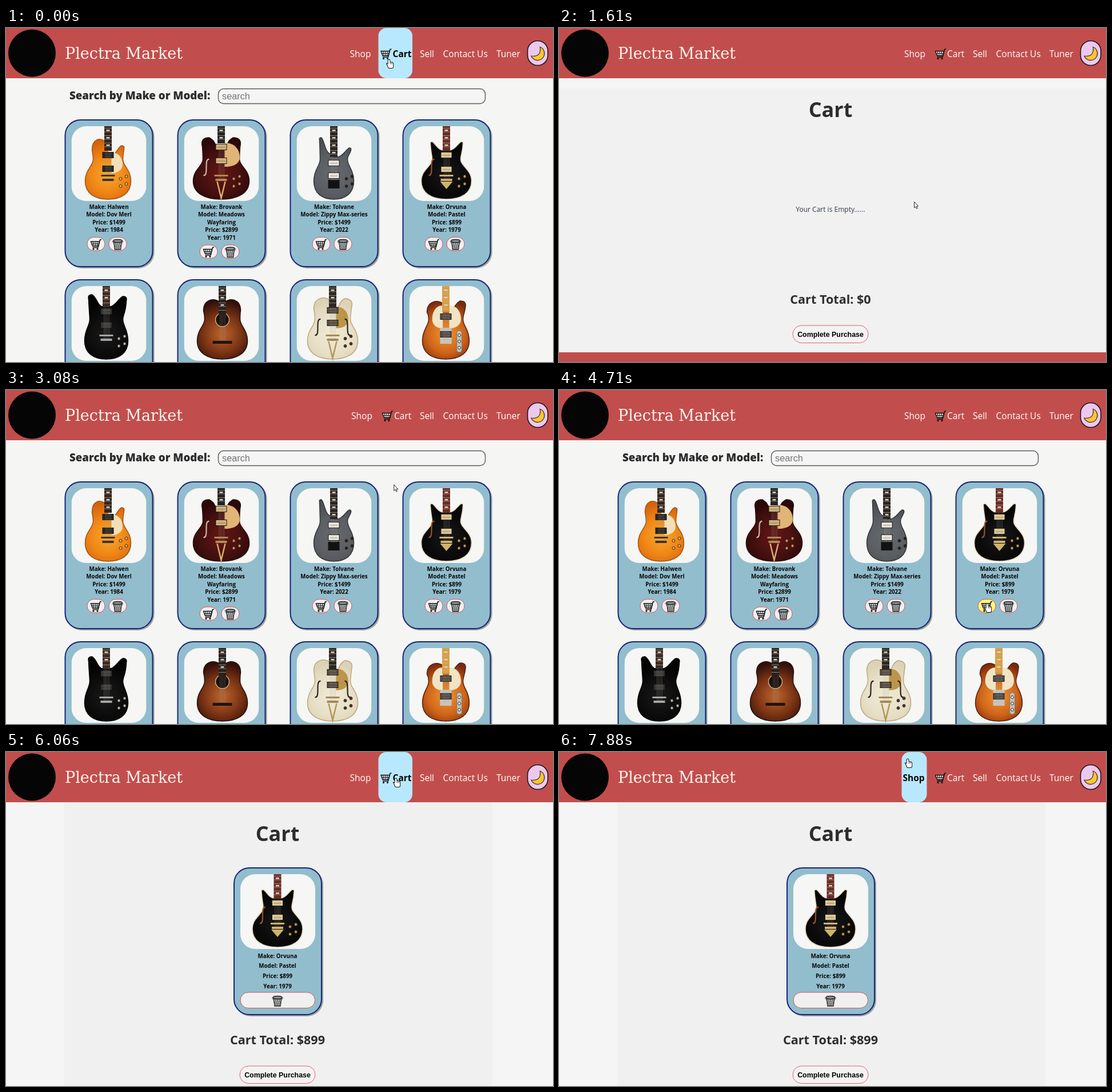
An HTML page with a canvas for the animation above (8 s loop, 957x585 px).

```html
<!DOCTYPE html>
<html lang="en">
<head>
<meta charset="utf-8">
<title>Guitar shop</title>
<style>
html, body { margin: 0; width: 100%; height: 100%; overflow: hidden; background: #f5f5f4; }
canvas { display: block; }
</style>
</head>
<body>
<canvas id="stage" width="957" height="585"></canvas>
<script>
const ctx = document.getElementById('stage').getContext('2d');
const LOOP = 8000;
const RED = '#c14e4c', INK = '#2d2d30', SKY = '#b8e8fd', PAPER = '#f5f5f4', ROSE = '#d9535c';
const UI = '"Open Sans", "Noto Sans", sans-serif';
const ARIAL = '"Liberation Sans", sans-serif';

// ---------- helpers ----------
function rect(x, y, w, h, fill) {
  ctx.fillStyle = fill;
  ctx.fillRect(x, y, w, h);
}
function paint(fill, stroke, width = 1) {
  if (fill) { ctx.fillStyle = fill; ctx.fill(); }
  if (stroke) { ctx.strokeStyle = stroke; ctx.lineWidth = width; ctx.stroke(); }
}
function pill(x, y, w, h, r, fill, stroke, width) {
  ctx.beginPath();
  ctx.roundRect(x, y, w, h, r);
  paint(fill, stroke, width);
}
function disc(x, y, r, fill, stroke, width) {
  ctx.beginPath();
  ctx.arc(x, y, r, 0, 7);
  paint(fill, stroke, width);
}
function poly(pts, fill, stroke, width) {
  ctx.beginPath();
  for (let i = 0; i < pts.length; i += 2) ctx.lineTo(pts[i], pts[i + 1]);
  if (fill) ctx.closePath();
  paint(fill, stroke, width);
}
function text(str, x, y, font, color = '#000', align = 'left') {
  ctx.font = font;
  ctx.fillStyle = color;
  ctx.textAlign = align;
  ctx.fillText(str, x, y);
}
function at(x, y, draw, sx = 1, sy = 1) {
  ctx.save();
  ctx.translate(x, y);
  ctx.scale(sx, sy);
  draw();
  ctx.restore();
}

// ---------- guitars, in a 131 px square ----------
// Shoulders are [x, y] when round, or [x, y, cut depth, tip radius] for a horn.
const guitars = [
  { cx: 64, low: 40, waist: 26, left: [28, 23], right: [28, 34, 50, 3], tones: ['#f79f28', '#ee8516', '#d3620c'],
    edge: '#a3520f', neck: '#35241d', end: 43, pickups: [46, 70], coil: '#292725', bridge: '#3a3330',
    knob: '#e8ad55', guard: [46, 27, 36, '#f2dfb8'] },
  { cx: 65, low: 49, waist: 32, left: [33, 20, 32, 8], right: [33, 20, 32, 8], tones: ['#5e1414', '#481010', '#2c0909'],
    edge: '#260707', neck: '#252122', end: 30, pickups: [32, 56], coil: '#d5b37a', bridge: '#b08a52',
    knob: '#c99a55', guard: [29, 34, 42, '#e0b577'], slots: [-1], slotColor: '#cbb9a5', vee: '#d8b06a' },
  { cx: 65, low: 35, waist: 24, left: [25, 20, 48, 2], right: [30, 38, 54, 2], tones: ['#63666a', '#5b5e62', '#4b4e52'],
    edge: '#333538', neck: '#2a2523', end: 54, pickups: [60, 82], coil: '#f0ede4', plate: [94, 15, '#121213'],
    knob: '#1e1f21' },
  { cx: 65, low: 44, waist: 25, left: [28, 27, 42, 2], right: [29, 27, 42, 2], tones: ['#151515', '#0b0b0b', '#050505'],
    edge: '#e5d8ba', neck: '#6c2c24', end: 43, pickups: [46, 71], coil: '#e2cd98', bridge: '#d1b26e',
    knob: '#c99a55', slots: [-1], slotColor: '#9a5230', tail: '#d1b26e' },
  { cx: 61, low: 38, waist: 29, left: [31, 15, 36, 4], right: [35, 18, 36, 4], tones: ['#171717', '#0c0c0c', '#030303'],
    edge: '#000', neck: '#3d2b23', end: 35, pickups: [40, 64], coil: '#3a3a3a', bridge: '#a5a5a5', knob: '#b5b5b5' },
  { cx: 67, low: 44, waist: 31, left: [33, 24], right: [32, 24], tones: ['#ad5a28', '#7c3414', '#32110a'],
    edge: '#24100b', neck: '#29211e', end: 50, hole: 59 },
  { cx: 63, low: 44, waist: 31, left: [33, 21], right: [33, 22, 38, 8], tones: ['#eee8d2', '#e8e0c8', '#dcd2b6'],
    edge: '#bda77b', neck: '#2d2824', end: 37, pickups: [38, 60], coil: '#5d5142', bridge: '#a28957',
    knob: '#423728', guard: [36, 29, 38, '#bd944a'], slots: [-1, 1], slotColor: '#2a231c', vee: '#b39658' },
  { cx: 64, low: 41, waist: 30, left: [33, 27], right: [34, 26, 44, 6], tones: ['#e88a2c', '#cf6419', '#7a2a0e'],
    edge: '#55200f', neck: '#dfa241', end: 45, guard: [34, 28, 40, '#f1e4c5'], wideGuard: true,
    plate: [73, 28, '#c7c5bf'], pickups: [49, 80], coil: '#55514c', switches: true }
];

function halfBody({ low, waist }, [x, y, cut, tip]) {
  ctx.beginPath();
  ctx.moveTo(-.5, cut || y + 3);
  ctx.lineTo(6, cut || y + 3);
  if (cut) {
    ctx.bezierCurveTo(15, cut, x - 3 * tip - 2, y + tip, x - 1.5 * tip, y);
    ctx.quadraticCurveTo(x + tip / 2, y, x, y + 2 * tip);
  } else {
    ctx.bezierCurveTo(13, y - 3, x, y - 2, x, y + 19);
  }
  ctx.bezierCurveTo(x - 1, 48, waist, 50, waist, 58);
  ctx.bezierCurveTo(waist, 70, low, 76, low, 96);
  ctx.bezierCurveTo(low, 117, low * .6, 128, -.5, 128);
}
function drawGuitar(g) {
  const tone = ctx.createRadialGradient(0, 84, 8, 0, 84, 58);
  g.tones.forEach((c, i) => tone.addColorStop(i / 2, c));
  at(g.cx, 0, () => halfBody(g, g.right) || paint(tone, g.edge, 1.5));
  at(g.cx, 0, () => halfBody(g, g.left) || paint(tone, g.edge, 1.5), -1);
  at(g.cx, 0, () => {
    if (g.guard) drawGuard(...g.guard);
    if (g.wideGuard) at(0, 0, () => drawGuard(...g.guard), -.9);
    (g.slots || []).forEach(s => at(s * 26, 72, () => drawSlot(g.slotColor), -s));
    if (g.hole) {
      disc(0, g.hole, 12, '#1a100c', '#d3a877', 1.5);
      rect(-17, 96, 34, 5, '#21130e');
    }
    drawNeck(g.neck, g.end);
    if (g.plate) rect(-10, g.plate[0], 20, g.plate[1], g.plate[2]);
    (g.pickups || []).forEach(y => drawPickup(y, g.coil));
    for (let i = -2; i <= 2; i++) rect(i * 2.3, g.end, .6, 95 - g.end, 'rgba(170,165,150,.5)');
    if (g.bridge) {
      rect(-12, 85, 24, 3, g.bridge);
      rect(-10, 92, 20, 4, g.bridge);
    }
    if (g.tail) poly([-11, 97, 11, 97, 0, 110], g.tail);
    if (g.vee) poly([-7, 97, 0, 126, 7, 97], null, g.vee, 2.5);
    if (g.knob) {
      for (let i = 0; i < 4; i++) disc(22 + i % 2 * 10, 92 - i % 2 * 4 + (i >> 1) * 13, 2.5, g.knob, '#3a2a1c');
    }
    if (g.switches) {
      pill(19, 78, 9, 38, 4, '#c4c0b7', '#77706a');
      for (let y = 86; y < 112; y += 11) disc(23.5, y, 2.5, '#ece8df', '#3a2a1c');
    }
  });
}
function drawGuard(y, w, h, color) {
  ctx.beginPath();
  ctx.moveTo(6, y);
  ctx.bezierCurveTo(w * .8, y, w, y + h * .4, w - 2, y + h * .7);
  ctx.quadraticCurveTo(w - 6, y + h, 6, y + h);
  paint(color);
}
function drawSlot(color) {
  ctx.beginPath();
  ctx.moveTo(5, -14);
  ctx.bezierCurveTo(-5, -16, 5, 16, -5, 14);
  paint(null, color, 2.2);
}
function drawNeck(color, end) {
  rect(-6.5, 0, 13, end, color);
  for (let y = 3; y < end - 2; y += 6.5) rect(-6.5, y, 13, .8, '#a69a8c');
  for (let y = 6; y < end - 6; y += 13) rect(-3, y, 6, 2.5, '#d8d4c8');
}
function drawPickup(y, color) {
  rect(-10, y - 1, 20, 11, '#1c1714');
  rect(-9, y, 18, 9, color);
  rect(-7, y + 4.5, 14, 1, 'rgba(0,0,0,.35)');
}

const stock = [
  ['Make: Halwen', 'Model: Dov Merl', 'Price: $1499', 'Year: 1984'],
  ['Make: Brovank', 'Model: Meadows', 'Wayfaring', 'Price: $2899', 'Year: 1971'],
  ['Make: Tolvane', 'Model: Zippy Max-series', 'Price: $1499', 'Year: 2022'],
  ['Make: Orvuna', 'Model: Pastel', 'Price: $899', 'Year: 1979']
];

// ---------- icons ----------
function cartIcon(x, y) {
  at(x, y, () => {
    poly([-9, -5, 6, -5, 4, 3, -6, 3], '#e9e9e9', '#111', 1.4);
    for (let i = 0; i < 3; i++) poly([-5.5 + i * 3.7, -5, -3.8 + i * 3, 3], null, '#111');
    poly([-8, -1, 5, -1], null, '#111');
    poly([9.5, -8.5, 7, -8, 3.5, 5.5, -6, 5.5], null, '#111', 1.5);
    for (const wheel of [-4.5, 2.5]) disc(wheel, 8, 1.6, '#111');
  });
}
function binIcon(x, y) {
  at(x, y, () => {
    poly([-7, -6, 7, -6, 5, 9, -5, 9], '#b8bcbe', '#222', 1.4);
    for (let i = -1; i < 3; i++) {
      for (const s of [-1, 1]) poly([s * (i * 4 - 6), -6, s * (1 + i * 2.4), 8], null, '#555', .8);
    }
    ctx.beginPath();
    ctx.ellipse(0, -6, 8, 2.6, 0, 0, 7);
    paint('#8e9496', '#222', 1.5);
  });
}
function moonIcon(x, y) {
  ctx.beginPath();
  ctx.arc(x, y, 12, -1.2, 2.75);
  ctx.quadraticCurveTo(x + 7, y + 6.5, x + 4.3, y - 11.2);
  ctx.closePath();
  paint('#fbc531', '#3d2a15', 1.2);
}

// ---------- page parts ----------
function card(x, y, guitar) {
  pill(x + 2, y + 2, 155, 259, 28, '#9da291');
  pill(x + 1, y + 1, 153, 257, 27, '#92bdcd', '#14237f', 2);
  at(x + 12, y + 12, () => {
    ctx.beginPath();
    ctx.roundRect(0, 0, 131, 131, 26);
    ctx.clip();
    rect(0, 0, 131, 131, '#f6f6f5');
    drawGuitar(guitar);
  });
}
function details(list, x, y, step) {
  list.forEach((s, i) => text(s, x, y + i * step, `700 9.8px ${UI}`, '#060606', 'center'));
}
function shopPage(p) {
  rect(0, 88, 957, 497, PAPER);
  text('Search by Make or Model:', 111, 125, `800 18.7px ${UI}`, INK);
  pill(371.5, 106.5, 467, 26, 9, '#f5f5f5', '#5a5a5a', 1.4);
  text('search', 378, 125, `16.3px ${ARIAL}`, '#757575');
  let hot = false;
  guitars.forEach((guitar, i) => {
    const x = 102.5 + i % 4 * 197, y = i < 4 ? 160 : 440, info = stock[i];
    card(x, y, guitar);
    if (!info) return;
    details(info, x + 77.5, y + 156.5, 13.5);
    const by = y + 152.5 + info.length * 13.5;
    [cartIcon, binIcon].forEach((icon, k) => {
      const bx = x + 39.5 + k * 38;
      const over = p.x > bx && p.x < bx + 31 && p.y > by && p.y < by + 24;
      hot = hot || over;
      pill(bx, by, 31, 23.5, 12, over ? '#fdf87c' : '#f0f0f0', ROSE);
      icon(bx + 15.5, by + 12.5);
    });
  });
  return hot;
}
function checkout(total, y) {
  text('Cart', 475, 156, `700 36px ${UI}`, INK, 'center');
  text('Cart Total: $' + total, 475, y, `700 21.6px ${UI}`, INK, 'center');
  pill(409, y + 38.5, 132, 30.5, 15.5, '#f3f3f3', '#e2606b');
  text('Complete Purchase', 475, y + 58, `700 12.4px ${ARIAL}`, '#000', 'center');
}
function emptyCart() {
  rect(0, 88, 957, 18, '#f5f5f5');
  rect(0, 106, 957, 462, '#f1f1f1');
  rect(0, 568, 957, 17, RED);
  text('Your Cart is Empty......', 475, 322, `12px ${UI}`, '#333a4a', 'center');
  checkout(0, 482.5);
}
function fullCart() {
  rect(0, 88, 957, 497, '#f5f5f5');
  rect(102, 88, 749, 497, '#f0f0f0');
  card(398, 202, guitars[3]);
  details(stock[3], 475, 360.5, 17.7);
  pill(410, 421, 130.5, 27.5, 14, '#f0f0f0', ROSE);
  binIcon(475, 436);
  checkout(899, 511.5);
}

const tabs = [
  { name: 'Shop', x: 604, left: 599.5, right: 643.5 },
  { name: 'Cart', x: 679, left: 651.5, right: 711 },
  { name: 'Sell', x: 724, left: 719, right: 752 },
  { name: 'Contact Us', x: 764.5 },
  { name: 'Tuner', x: 858 }
];
function header(p) {
  rect(0, 0, 957, 88, RED);
  disc(45.5, 44, 41.5, '#050505');
  text('Plectra Market', 103, 54, '27px "DejaVu Serif", "Noto Serif", serif', '#fbf3ee');
  const hot = p.y < 88 ? tabs.findIndex(b => p.x > b.left && p.x < b.right) : -1;
  tabs.forEach((b, i) => {
    const on = i === hot, x = b.x - (i <= hot ? 2.5 : 0);
    if (on) pill(b.left, 0, b.right - b.left, 88, 14, SKY);
    if (b.name === 'Cart') cartIcon(x - 11.5, 45.5);
    text(b.name, x, 50.5, `${on ? 700 : 400} 15.5px ${UI}`, on ? '#000' : '#fff');
  });
  pill(912.5, 22.5, 35.5, 43, 17.7, '#ebc9ef', '#1c1520', 1.6);
  moonIcon(930, 44.5);
  return hot >= 0;
}

// ---------- pointer ----------
// Each move: start and end time, then where it leads
const moves = [
  [30, 270, 691, 42], [740, 1370, 521, 519], [1370, 1830, 735, 60], [1830, 2190, 616, 47],
  [2690, 3520, 786, 372], [3640, 4000, 749, 374], [4710, 5070, 750, 84], [5070, 5900, 682, 46],
  [6090, 6870, 589, 518], [6990, 7110, 509, 538], [7110, 7590, 664, 72], [7700, 7830, 610, 12]
];
function pointer(time) {
  // The pointer is refreshed about every 120 ms
  const t = Math.floor((time - 30) / 120) * 120 + 30;
  let x = 670, y = 55;
  for (const [from, to, tx, ty] of moves) {
    const f = Math.min(1, Math.max(0, (t - from) / (to - from)));
    const ease = f * f * (3 - 2 * f);
    x += (tx - x) * ease;
    y += (ty - y) * ease;
  }
  return { x, y };
}
function drawPointer(p, hand) {
  at(p.x, p.y, () => {
    ctx.lineJoin = 'round';
    if (!hand) return poly([.5, 0, .5, 10.5, 2.8, 8.4, 4.6, 12, 6.2, 11.2, 4.6, 7.8, 7.6, 7.5], '#fff', '#111', .9);
    for (const edge of ['#111', null]) {
      pill(-1.3, .5, 2.8, 10, 1.4, '#fff', edge, 2);
      pill(-1.3, 5.5, 8.5, 9.5, 2.5, '#fff', edge, 2);
      poly([-4, 7.5, -1, 9, 1, 14, -1, 13], '#fff', edge, 2);
    }
    for (const x of [1.8, 4.5]) rect(x, 6, .8, 2.5, '#111');
  });
}

function draw(t) {
  const p = pointer(t);
  let hand = false;
  if (t < 650 || (t >= 2690 && t < 6060)) hand = shopPage(p);
  else if (t < 2690) emptyCart();
  else fullCart();
  hand = header(p) || hand;
  drawPointer(p, hand);
}

const start = performance.now();
function tick() {
  draw((performance.now() - start) % LOOP);
  requestAnimationFrame(tick);
}
tick();
</script>
</body>
</html>
```
